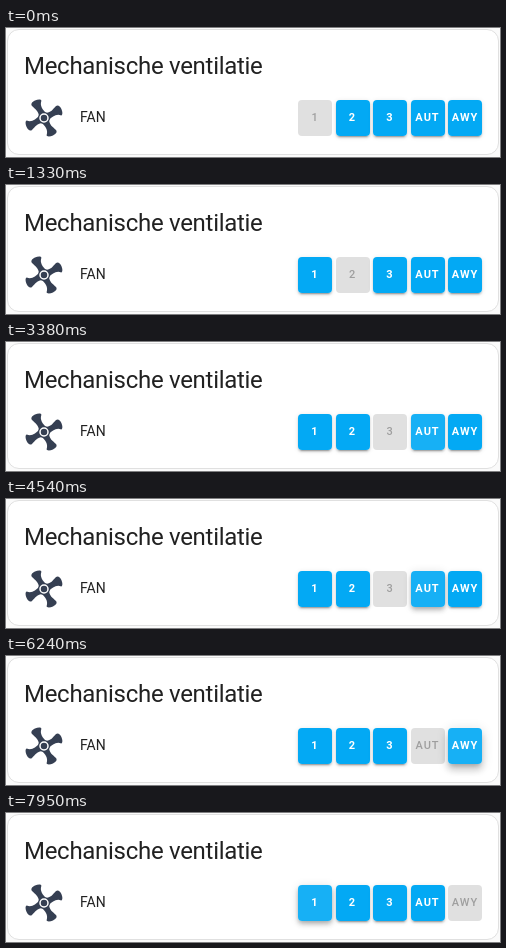
Animation, 494 px wide and 129 px high, one loop 8000 ms. Source, as an HTML page:

```html
<!DOCTYPE html>
<html lang="nl">
<head>
<meta charset="utf-8">
<title>Mechanische ventilatie</title>
<style>
:root {
  --flat: 0 0 0 0 rgba(0,0,0,.2), 0 0 0 0 rgba(0,0,0,.14), 0 0 0 0 rgba(0,0,0,.12);
  --rest: 0 3px 1px -2px rgba(0,0,0,.2), 0 2px 2px 0 rgba(0,0,0,.14), 0 1px 5px 0 rgba(0,0,0,.12);
  --lift: 0 2px 4px -1px rgba(0,0,0,.2), 0 4px 5px 0 rgba(0,0,0,.14), 0 1px 10px 0 rgba(0,0,0,.12);
  --press: 0 5px 5px -3px rgba(0,0,0,.2), 0 8px 10px 1px rgba(0,0,0,.14), 0 3px 14px 2px rgba(0,0,0,.12);
  --on: #03a9f4;
  --hover: #17b0f5;
  --off: #e0e0e0;
  --ease: cubic-bezier(.4, 0, .2, 1);
}
html, body { margin: 0; width: 100%; height: 100%; overflow: hidden; background: #fafafa; }
body { font-family: Roboto, sans-serif; color: #212121; }
.card {
  position: absolute; left: 1px; top: 1px; width: 492px; height: 126px;
  box-sizing: border-box; border: 1px solid #e0e0e0; border-radius: 12px; background: #fff;
}
.title, .name { position: absolute; white-space: nowrap; }
.title { left: 18px; top: 22px; font-size: 24px; line-height: 32px; letter-spacing: -.012em; }
.name { left: 74px; top: 79px; font-size: 14px; line-height: 20px; }
.fan { position: absolute; left: 18px; top: 70px; width: 40px; height: 40px; }
.btn {
  position: absolute; top: 72px; left: calc(292px + 37.5px * var(--i)); width: 34px; height: 36px;
  border-radius: 4px; text-align: center; font-size: 11px; line-height: 36px; letter-spacing: .0893em;
}
.btn, .btn span, .ink { animation: 8s linear infinite; }
.btn { animation-timing-function: var(--ease); }
.btn span { position: relative; }
.ink { position: absolute; inset: 0; border-radius: 4px; opacity: 0;
  background: radial-gradient(circle, #fff 60%, transparent) center / 100% 100% no-repeat; }

/* Elevation: 1% of the loop is 80 ms */
#b1 { animation-name: lift1; }
#b2 { animation-name: lift2; }
#b3 { animation-name: lift3; }
#b4 { animation-name: lift4; }
#b5 { animation-name: lift5; }
@keyframes lift1 {
  0%, 13.1% { box-shadow: var(--flat); }
  16.6%, 93.1% { box-shadow: var(--rest); }
  98.8%, 100% { box-shadow: var(--lift); }
}
@keyframes lift2 {
  0%, 7.1% { box-shadow: var(--rest); }
  10.6%, 12.5% { box-shadow: var(--lift); }
  13.1% { box-shadow: var(--press); }
  16.6%, 38.5% { box-shadow: var(--flat); }
  42%, 100% { box-shadow: var(--rest); }
}
@keyframes lift3 {
  0%, 5.8% { box-shadow: var(--rest); }
  7.1% { box-shadow: var(--lift); }
  10.6%, 18.4% { box-shadow: var(--rest); }
  21.7%, 35.7% { box-shadow: var(--lift); }
  37.6%, 38.5% { box-shadow: var(--press); }
  42%, 59.5% { box-shadow: var(--flat); }
  62.9%, 100% { box-shadow: var(--rest); }
}
@keyframes lift4 {
  0%, 42.2% { box-shadow: var(--rest); }
  46.6%, 58.7% { box-shadow: var(--lift); }
  59.5% { box-shadow: var(--press); }
  62.9%, 80.8% { box-shadow: var(--flat); }
  84.3%, 100% { box-shadow: var(--rest); }
}
@keyframes lift5 {
  0%, 65.3% { box-shadow: var(--rest); }
  68.8%, 77.2% { box-shadow: var(--lift); }
  79.4%, 80.8% { box-shadow: var(--press); }
  84.3%, 100% { box-shadow: var(--flat); }
}

/* Fill and label switch at once */
#b1 span { animation-name: text1; }
#b2 span { animation-name: text2; }
#b3 span { animation-name: text3; }
#b4 span { animation-name: text4; }
#b5 span { animation-name: text5; }
.btn span { color: #fff; font-weight: 700; animation-timing-function: step-end; }
@keyframes text1 { 0% { color: #9e9e9e; font-weight: 500; } 13.1%, 100% { color: #fff; font-weight: 700; } }
@keyframes text2 { 13.1% { color: #9e9e9e; font-weight: 500; } 38.5% { color: #fff; font-weight: 700; } }
@keyframes text3 { 38.5% { color: #9e9e9e; font-weight: 500; } 59.5% { color: #fff; font-weight: 700; } }
@keyframes text4 { 59.5% { color: #9e9e9e; font-weight: 500; } 80.8% { color: #fff; font-weight: 700; } }
@keyframes text5 { 80.8%, 100% { color: #9e9e9e; font-weight: 500; } }

.fill { position: absolute; inset: 0; border-radius: 4px; background: var(--on); animation: 8s step-end infinite; }
#b1 .fill { animation-name: fill1; }
#b2 .fill { animation-name: fill2; }
#b3 .fill { animation-name: fill3; }
#b4 .fill { animation-name: fill4; }
#b5 .fill { animation-name: fill5; }
@keyframes fill1 { 0% { background: var(--off); } 13.1% { background: var(--on); } 93.2%, 100% { background: var(--hover); } }
@keyframes fill2 { 7.1% { background: var(--hover); } 13.1% { background: var(--off); } 38.5% { background: var(--on); } }
@keyframes fill3 {
  5.8% { background: var(--hover); } 7.1% { background: var(--on); } 18.6% { background: var(--hover); }
  38.5% { background: var(--off); } 59.5% { background: var(--on); }
}
@keyframes fill4 { 42.2% { background: var(--hover); } 59.5% { background: var(--off); } 80.8% { background: var(--on); } }
@keyframes fill5 { 65.3% { background: var(--hover); } 80.8%, 100% { background: var(--off); } }

#b3 .ink { animation-name: ink3; }
#b5 .ink { animation-name: ink5; }
@keyframes ink3 {
  0%, 36.5% { opacity: 0; background-size: 30% 30%; }
  38.49% { opacity: .18; background-size: 150% 150%; }
  38.5%, 100% { opacity: 0; background-size: 150% 150%; }
}
@keyframes ink5 {
  0%, 78.2% { opacity: 0; background-size: 30% 30%; }
  80.79% { opacity: .18; background-size: 150% 150%; }
  80.8%, 100% { opacity: 0; background-size: 150% 150%; }
}
</style>
</head>
<body>
<div class="card"></div>
<div class="title">Mechanische ventilatie</div>
<svg class="fan" viewBox="-20 -20 40 40" fill="#353f52">
  <defs>
    <path id="blade" d="M-5 -1C-5 -7 -9 -9 -12 -12C-13.5 -14 -12 -16 -9 -17.4C-6 -18.7 -2.8 -18.8 -2.6 -17.2C-4.5 -12 -1 -8 2 -5L0 0Z"/>
  </defs>
  <use href="#blade"/>
  <use href="#blade" transform="rotate(90)"/>
  <use href="#blade" transform="rotate(180)"/>
  <use href="#blade" transform="rotate(270)"/>
  <circle r="6"/>
  <circle r="4" stroke="#fff" stroke-width="1.5"/>
</svg>
<div class="name">FAN</div>
<div class="btn" id="b1" style="--i:0"><i class="fill"></i><i class="ink"></i><span>1</span></div>
<div class="btn" id="b2" style="--i:1"><i class="fill"></i><i class="ink"></i><span>2</span></div>
<div class="btn" id="b3" style="--i:2"><i class="fill"></i><i class="ink"></i><span>3</span></div>
<div class="btn" id="b4" style="--i:3"><i class="fill"></i><i class="ink"></i><span>AUT</span></div>
<div class="btn" id="b5" style="--i:4"><i class="fill"></i><i class="ink"></i><span>AWY</span></div>
</body>
</html>
```
